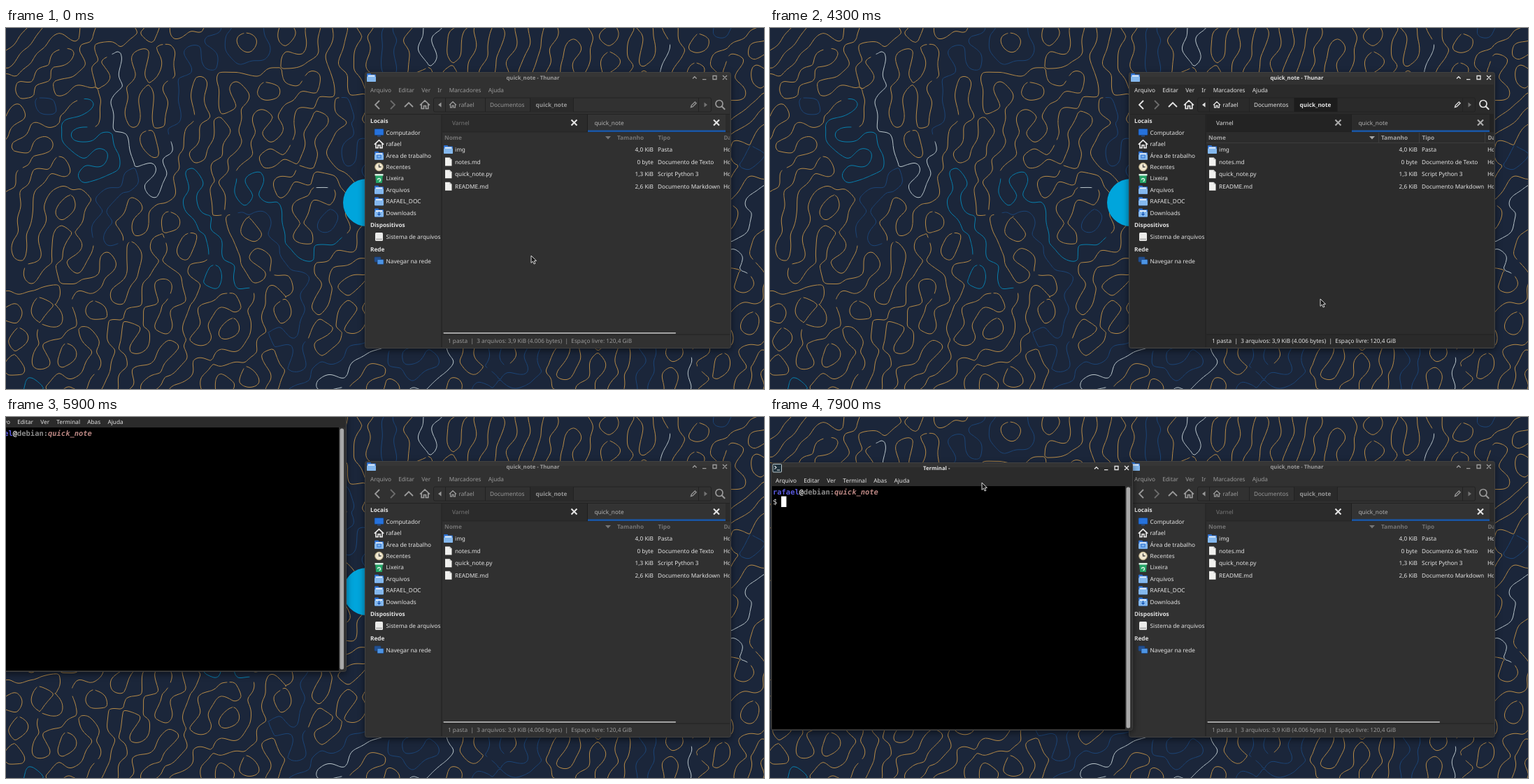
Animation, 1084 px wide and 517 px high, one loop 8 s. Source, as an HTML page with a canvas:

```html
<!DOCTYPE html>
<html lang="pt-BR">
<head>
<meta charset="utf-8">
<title>quick_note</title>
<style>
html, body { margin: 0; width: 100%; height: 100%; overflow: hidden; background: #1b263a; }
canvas, svg { position: absolute; left: 0; top: 0; width: 1084px; height: 517px; }
svg { --f: 0; }
text { font: 8.25px "Noto Sans", sans-serif; fill: #e4e4e4; white-space: pre; text-rendering: geometricPrecision; }
.b { font-weight: 700; }
.title { font-size: 7.7px; font-weight: 700; }
.end { text-anchor: end; }
.mid { text-anchor: middle; }
.mono { font: 700 10.45px "DejaVu Sans Mono", monospace; }
.line { fill: none; stroke: #e4e4e4; stroke-width: 1.3; }
.head { fill: #a6a6a6; }
.on { opacity: var(--f); }
.dim { opacity: calc(.58 + .42 * var(--f)); }
.faint { opacity: calc(.42 + .58 * var(--f)); }
.rev { opacity: calc(1 - .3 * var(--f)); }
.frame { filter: drop-shadow(0 3px 5px rgba(0, 0, 0, .5)); }
</style>
</head>
<body>
<canvas id="wall" width="1084" height="517"></canvas>
<svg id="stage" viewBox="0 0 1084 517"></svg>
<script>
const W = 1084, H = 517, LOOP = 8000;

// ---------- wallpaper: zero lines of a random wave field, cut into strokes ----------
function rng(seed) {
  return () => (seed = (seed * 16807) % 2147483647) / 2147483647;
}

function waveField(rnd, nx, ny, step) {
  const waves = Array.from({ length: 30 }, () => {
    const a = rnd() * 2 * Math.PI, k = 2 * Math.PI / (33 + 6 * rnd());
    return [k * Math.cos(a), k * Math.sin(a), rnd() * 2 * Math.PI];
  });
  return Float32Array.from({ length: nx * ny }, (_, q) => {
    const x = q % nx * step, y = Math.floor(q / nx) * step;
    return waves.reduce((sum, [kx, ky, p]) => sum + Math.cos(kx * x + ky * y + p), 0);
  });
}

// Edge 2q runs right from grid point q, edge 2q + 1 runs down
function zeroLines(f, nx, ny, step) {
  const links = new Map(), used = new Set();
  const ends = e => [e >> 1, (e >> 1) + (e & 1 ? nx : 1)];
  const crossed = e => { const [a, b] = ends(e); return f[a] > 0 !== f[b] > 0; };
  const point = e => {
    const [a, b] = ends(e), u = f[a] / (f[a] - f[b]);
    return [(a % nx + (e & 1 ? 0 : u)) * step, (Math.floor(a / nx) + (e & 1 ? u : 0)) * step];
  };
  const link = (a, b) => links.set(a, [...links.get(a) || [], b]);
  for (let j = 0; j < ny - 1; j++) for (let i = 0; i < nx - 1; i++) {
    const q = j * nx + i;
    const hit = [2 * q, 2 * q + 3, 2 * (q + nx), 2 * q + 1].filter(crossed);
    for (let h = 0; h < hit.length; h += 2) {
      link(hit[h], hit[h + 1]);
      link(hit[h + 1], hit[h]);
    }
  }
  const lines = [];
  const starts = [...links.keys()].sort((a, b) => links.get(a).length - links.get(b).length);
  for (let e of starts) {
    const chain = [];
    while (e !== undefined && !used.has(e)) {
      used.add(e);
      chain.push(point(e));
      e = links.get(e).find(n => !used.has(n));
    }
    if (chain.length > 14) lines.push(chain);
  }
  return lines;
}

function drawWall() {
  const g = document.getElementById('wall').getContext('2d');
  const step = 4, nx = W / step + 2, ny = Math.ceil(H / step) + 2, rnd = rng(4177);
  g.fillStyle = '#1b263a';
  g.fillRect(0, 0, W, H);
  g.lineCap = 'round';
  const pick = () => {
    const r = rnd();
    return r < .07 ? '#bcc8cd' : r < .14 ? '#0780ae' : r < .25 ? '#1b4577' : '#b78b47';
  };
  for (const chain of zeroLines(waveField(rnd, nx, ny, step), nx, ny, step)) {
    for (let i = 0; i < chain.length;) {
      const part = chain.slice(i, i += 60 + Math.floor(90 * rnd()));
      g.strokeStyle = pick();
      g.beginPath();
      part.forEach(([x, y], k) => {
        const [nextX, nextY] = part[k + 1] || [x, y];
        g.quadraticCurveTo(x, y, (x + nextX) / 2, (y + nextY) / 2);
      });
      g.stroke();
      i += 2;
    }
  }
  g.fillStyle = '#00a5dc';
  g.beginPath();
  g.arc(516, 250, 34, 0, 7);
  g.fill();
}

// ---------- drawing helpers ----------
const text = (x, y, s, cls = '', more = '') => `<text x="${x}" y="${y + 3}" class="${cls}" ${more}>${s}</text>`;
const rect = (x, y, w, h, fill, more = '') => `<rect x="${x}" y="${y}" width="${w}" height="${h}" fill="${fill}" ${more}/>`;
const path = (d, fill, more = '') => `<path d="${d}" fill="${fill}" ${more}/>`;
const line = (d, more = '') => `<path d="${d}" class="line" ${more}/>`;
const group = (cls, s) => `<g class="${cls}">${s}</g>`;
const menuBar = (x, y, names) =>
  text(x, y, names.split(' ').map((s, i) => `<tspan dx="${i ? 10.2 : 0}">${s}</tspan>`).join(''));

const folder = (x, y) => rect(x, y - 6, 6, 4, '#2b6fd0', 'rx="1"') + rect(x, y - 4.5, 13, 10.5, '#2b6fd0', 'rx="1"') +
  rect(x + 1.5, y - 3.5, 10, 4, '#e8f1fb') + rect(x, y - 1.5, 13, 7.5, '#84b8ee', 'rx="1"');
const page = (x, y) => path(`M${x} ${y - 6}h6.5l3 3v9h-9.5z`, '#f0f0ee') + path(`M${x + 6.5} ${y - 6}v3h3z`, '#bdbdbd');
const house = (x, y, k) => `<g transform="translate(${x} ${y}) scale(${k})">` +
  path('M-7 .5L0-6 7 .5M-4.8-1V5.5H-1.5V1.5H1.5V5.5H4.8V-1', 'none', 'stroke="#e8e8e8" stroke-width="1.7"') + '</g>';
const screen = (x, y, w, h, fill) => rect(x, y, w, h, fill, 'rx="1" stroke="#17417c" stroke-width=".7"');
const controls = (r, y) => line(`M${r - 55} ${y + 1.5}l2.8-2.8 2.8 2.8M${r - 41} ${y + 2.6}h5.4` +
  `M${r - 26} ${y - 2.5}h5v5h-5zM${r - 12} ${y - 3}l6 6m0-6l-6 6`);
const frame = (x, y, w, h, fill) => rect(x + .5, y + .5, w - 1, h - 1, fill, 'rx="3" stroke="#414141" class="frame"') +
  rect(x + 1.5, y + 1, w - 3, 6, '#3c3c3c', 'rx="2" opacity=".5"');
// Two stacked fills, the second one shown while the window has focus
const fade = (x, y, w, h, idle, active) => rect(x, y, w, h, idle) + rect(x, y, w, h, active, 'class="on"');

// ---------- file manager ----------
function sidebar() {
  const rows = ['Computador', 'rafael', 'Área de trabalho', 'Recentes', 'Lixeira', 'Arquivos', 'RAFAEL_DOC', 'Downloads'];
  const y = i => 150 + 16.36 * i;
  let s = rows.map((r, i) => text(543.5, y(i), r)).join('');
  s += screen(527, 144.5, 13, 9, '#2672dc') + rect(531, 154, 5, 1.5, '#2a4f86');
  s += house(533.5, y(1), .95);
  s += [2, 5, 6, 7].map(i => folder(527, y(i))).join('');
  s += rect(531, 182, 5, 4, 'none', 'stroke="#2b6fd0"') + line('M533.5 263v5m-2-2l2 2 2-2', 'style="stroke:#1c5ab4"');
  s += '<circle cx="533.5" cy="199" r="5.8" fill="#efe6cf" stroke="#b5a67c"/>' + line('M533.5 195.5v3.5h3', 'style="stroke:#444"');
  s += path('M528 210h11l-1.2 12h-8.6z', '#25a467') + rect(527.5, 209, 12, 2.5, '#d9eee2') + line('M531.5 217.5a2 2 0 1 1 2 2', 'style="stroke:#dff5e8"');
  s += rect(528, 293, 11, 12, '#ececea', 'rx="1.5"') + rect(529, 301.5, 9, 2, '#b5b5b5');
  s += screen(527, 328, 9, 7, '#24508f') + screen(531, 331.5, 9, 7, '#4d94e2');
  return s + text(521, 133, 'Locais', 'b') + text(521, 282, 'Dispositivos', 'b') + text(521, 316.5, 'Rede', 'b') +
    text(543.5, 299, 'Sistema de arquivos') + text(543.5, 333.5, 'Navegar na rede');
}

function toolbar() {
  return group('dim', menuBar(521, 88.5, 'Arquivo Editar Ver Ir Marcadores Ajuda')) +
    rect(611.5, 100, 397, 20, 'none', 'stroke="#222" rx="2"') +
    fade(750, 100, 61, 20, '#2a2a2a', '#1c1c1c') +
    line('M628.5 100v20M685.5 100v20M749.5 100v20M811.5 100v20M990.5 100v20', 'style="stroke:#222;stroke-width:1"') +
    group('dim', line('M534 104l-6 6 6 6M570 113l6-6 6 6', 'style="stroke-width:1.8"') +
      house(599, 110, 1) + house(639, 110, .72) + path('M622.5 106.5v7l-4.5-3.5z', '#e4e4e4') +
      text(647.5, 110, 'rafael') + text(692, 110, 'Documentos') + text(757.5, 110, 'quick_note', 'b') +
      line('M979.5 113.5l.8-2.6 5-5 1.8 1.8-5 5z') +
      '<circle cx="1020" cy="108.5" r="5" class="line" style="stroke-width:1.7"/>' + line('M1023.7 112.3l4.5 4.5', 'style="stroke-width:2"')) +
    line('M550 104l6 6-6 6', 'style="stroke:#6c6c6c;stroke-width:1.8"') + path('M998.5 106.5v7l4.5-3.5z', '#747474');
}

function files() {
  const rows = [['img', '4,0 KiB', 'Pasta'], ['notes.md', '0 byte', 'Documento de Texto'],
    ['quick_note.py', '1,3 KiB', 'Script Python 3'], ['README.md', '2,6 KiB', 'Documento Markdown']];
  return rows.map(([name, size, type], i) => {
    const y = 174 + 17.6 * i;
    return (i ? page(628, y) : folder(626, y)) + text(642, y, name) + text(926, y, size, 'end') +
      text(932, y, type) + text(1026, y, 'Hoje');
  }).join('');
}

function manager() {
  return frame(513, 63, 524, 396, '#313131') +
    rect(515, 81, 520, 376, '#2a2a2a', 'class="on"') +
    folder(516, 71) +
    `<g id="title">${text(753.5, 71, 'quick_note - Thunar', 'title mid')}${controls(1037, 71)}</g>` +
    toolbar() +
    rect(515, 123, 520, 1, '#232323') + rect(622.5, 124, 1, 333, '#212121') + sidebar() +
    fade(624, 124, 411, 25, '#2b2b2b', '#232323') + fade(832, 124, 197, 25, '#333', '#2b2b2b') +
    rect(831, 124, 1, 25, '#1f1f1f') + rect(624, 148.5, 411, 1, '#222') + rect(832, 146.3, 197, 2.7, '#1a55a2') +
    group('faint', text(638, 135.5, 'Varnel')) + text(841.5, 135.5, 'quick_note', '', 'style="fill:#b4b4b4"') +
    group('rev', line('M808.5 131.5l8 8m0-8l-8 8M1012 131.5l8 8m0-8l-8 8', 'style="stroke-width:2.1"')) +
    fade(624, 149.5, 411, 288.5, '#303030', '#2c2c2c') +
    '<g clip-path="url(#list)">' +
    group('dim', text(627, 157, 'Nome', 'b head') + path('M857 155h8l-4 4.5z', '#a6a6a6') +
      text(874, 157, 'Tamanho', 'b head') + text(932.5, 157, 'Tipo', 'b head') + text(1026.5, 157, 'Data', 'b head')) +
    group('on', line('M870.5 150v14M928.5 150v14M1022.5 150v14M624 164.5h411', 'style="stroke:#3d3d3d;stroke-width:1"')) +
    files() + '</g>' +
    rect(625.5, 436, 332.5, 1.7, '#b2b2b2', 'id="bar" rx=".8"') +
    rect(624, 438.5, 411, 1, '#222') +
    group('dim', '<text id="status" x="632" y="451"></text>');
}

// ---------- context menu ----------
function menu() {
  const y = i => 338.5 + 17.32 * i;
  const items = ['Criar pasta...', 'Criar documento', 'Colar', 'Abrir terminal aqui', 'Organizar itens',
    'Configurar colunas...', 'Ampliar', 'Diminuir', 'Tamanho normal', 'Propriedades...'];
  const box = (i, d) => rect(756, y(i) - 4.5, 8.5, 8.5, '#f0f0f0', 'rx="1"') + line(d, 'style="stroke:#222"');
  const sheet = i => path(`M757 ${y(i) - 5}h5l2.5 2.5v7.5h-7.5z`, '#f0f0ee');
  return rect(751.5, 327.5, 115, 177.5, '#2b2b2b', 'stroke="#1b1b1b" class="frame"') +
    rect(752, 382, 114.5, 17.2, '#1655a6', 'id="pick"') +
    items.map((s, i) => text(768, y(i), s, '', i === 2 ? 'style="fill:#777"' : '')).join('') +
    [1, 4].map(i => path(`M856 ${y(i) - 4}v8l4.5-4z`, '#e4e4e4')).join('') +
    rect(756, 334.5, 4, 3, '#b39a63') + rect(756, 336, 9, 6.5, '#dccb9d') +
    sheet(1) + rect(757, 369.5, 7, 8, '#6d5a43') + rect(759, 372.5, 6, 5, '#888') +
    rect(755.5, 386, 9.5, 8, '#2b3a40', 'stroke="#c7d0d2" stroke-width=".8"') + line('M757 388l1.5 1.3-1.5 1.3', 'style="stroke-width:.8"') +
    box(6, 'M758 442.2h4.6m-2.3-2.3v4.6') + box(7, 'M758 459.5h4.6') + box(8, 'M759 475.3l1.5-1v5') +
    sheet(9) + line('M758.5 494h4m-4 2.2h4', 'style="stroke:#888;stroke-width:.8"');
}

// ---------- terminal, drawn from its own corner ----------
function terminal() {
  return frame(0, 0, 518, 384, '#2b2b2b') +
    rect(3, 2.5, 12.5, 11.5, '#20323c', 'stroke="#b8c6cb" rx="1"') + line('M5.5 5l2.5 2.3-2.5 2.3M9 11h4', 'style="stroke-width:1.1"') +
    text(218, 8, 'Terminal -', 'title') + controls(518, 8) +
    menuBar(7, 25.5, 'Arquivo Editar Ver Terminal Abas Ajuda') +
    rect(2, 34, 505, 348, '#000') + rect(507, 34, 9, 348, '#333') + rect(508.5, 35.5, 5.6, 345, '#a9a9a9', 'rx="2.5"') +
    '<text class="mono" x="3" y="46"><tspan fill="#5a5ae0">rafael</tspan><tspan fill="#eee">@</tspan>' +
    '<tspan fill="#8b8b8b">debian:</tspan><tspan fill="#bb8783" font-style="italic">quick_note</tspan></text>' +
    '<text class="mono" x="3" y="60" style="font-weight:400">$</text>' +
    rect(15.5, 49, 6.5, 14.5, 'none', 'id="caret" stroke="#eee"');
}

const arrowTip = 'M0 0V10.4L2.4 8.2 4.1 12 5.9 11.2 4.3 7.5 7.5 7.3Z';
const grabCross = [0, 90, 180, 270].map(a =>
  `<path d="M-1.1-1.1V-3.4H-2.4L0-6 2.4-3.4H1.1V-1.1" transform="rotate(${a})" fill="#1c1c1c" stroke="#eee" stroke-width=".9"/>`).join('');

drawWall();
const stage = document.getElementById('stage');
stage.innerHTML = '<defs><clipPath id="list"><rect x="624" y="149" width="411" height="289"/></clipPath></defs>' +
  manager() + `<g id="menu">${menu()}</g><g id="term">${terminal()}</g>` +
  `<g id="arrow">${path(arrowTip, '#161616', 'stroke="#eee" stroke-width=".9"')}</g><g id="grab">${grabCross}</g>`;

// ---------- motion, in steps of 100 ms ----------
const ramp = (t, from, span) => Math.min(1, Math.max(0, (t - from) / span));
const within = (t, a, b) => t >= a && t < b;

// Linear path through keys of [time, x, y], on whole pixels
function along(keys, t) {
  const n = keys.findIndex(k => k[0] > t);
  if (n === 0) return keys[0].slice(1);
  if (n < 0) return keys[keys.length - 1].slice(1);
  const a = keys[n - 1], b = keys[n], u = (t - a[0]) / (b[0] - a[0]);
  return [1, 2].map(k => Math.round(a[k] + (b[k] - a[k]) * u));
}
const drag = [[5600, -81, -103], [5700, -57, -74], [6200, 8, 63], [7400, 1, 65]];
const pointer = [[4500, 787, 388], [5100, 240, -98], [7700, 322, 70], [7900, 303, 94]];

const el = {};
for (const id of ['title', 'bar', 'status', 'menu', 'pick', 'term', 'caret', 'arrow', 'grab']) el[id] = document.getElementById(id);
const show = (e, on) => e.style.display = on ? '' : 'none';
const place = (e, x, y) => e.setAttribute('transform', `translate(${x} ${y})`);

function render(t) {
  const [x, y] = along(drag, t), dragging = within(t, 5700, 7800);
  stage.style.setProperty('--f', ramp(t, 400, 300) - ramp(t, 4500, 300));
  el.title.style.opacity = within(t, 500, 4500) ? 1 : .6;
  el.bar.style.opacity = 1 - ramp(t, 1800, 300) + ramp(t, 4600, 200);
  el.status.textContent = within(t, 3500, 4300) ? 'Exemplo de uma ação personalizada'
    : '1 pasta  |  3 arquivos: 3,9 KiB (4.006 bytes)  |  Espaço livre: 120,4 GiB';
  show(el.menu, within(t, 2400, 4200));
  show(el.pick, t >= 3500);
  show(el.term, t >= 4500);
  place(el.term, x, y);
  el.caret.setAttribute('fill', t >= 7800 ? '#fff' : 'none');
  show(el.grab, dragging);
  show(el.arrow, !dragging);
  place(el.grab, x + 321, y + 5);
  place(el.arrow, ...(t < 3500 ? [751, 326] : along(pointer, t)));
}

const start = performance.now();
function tick() {
  const t = (performance.now() - start) % LOOP;
  render(t - t % 100);
  requestAnimationFrame(tick);
}
tick();
</script>
</body>
</html>
```
